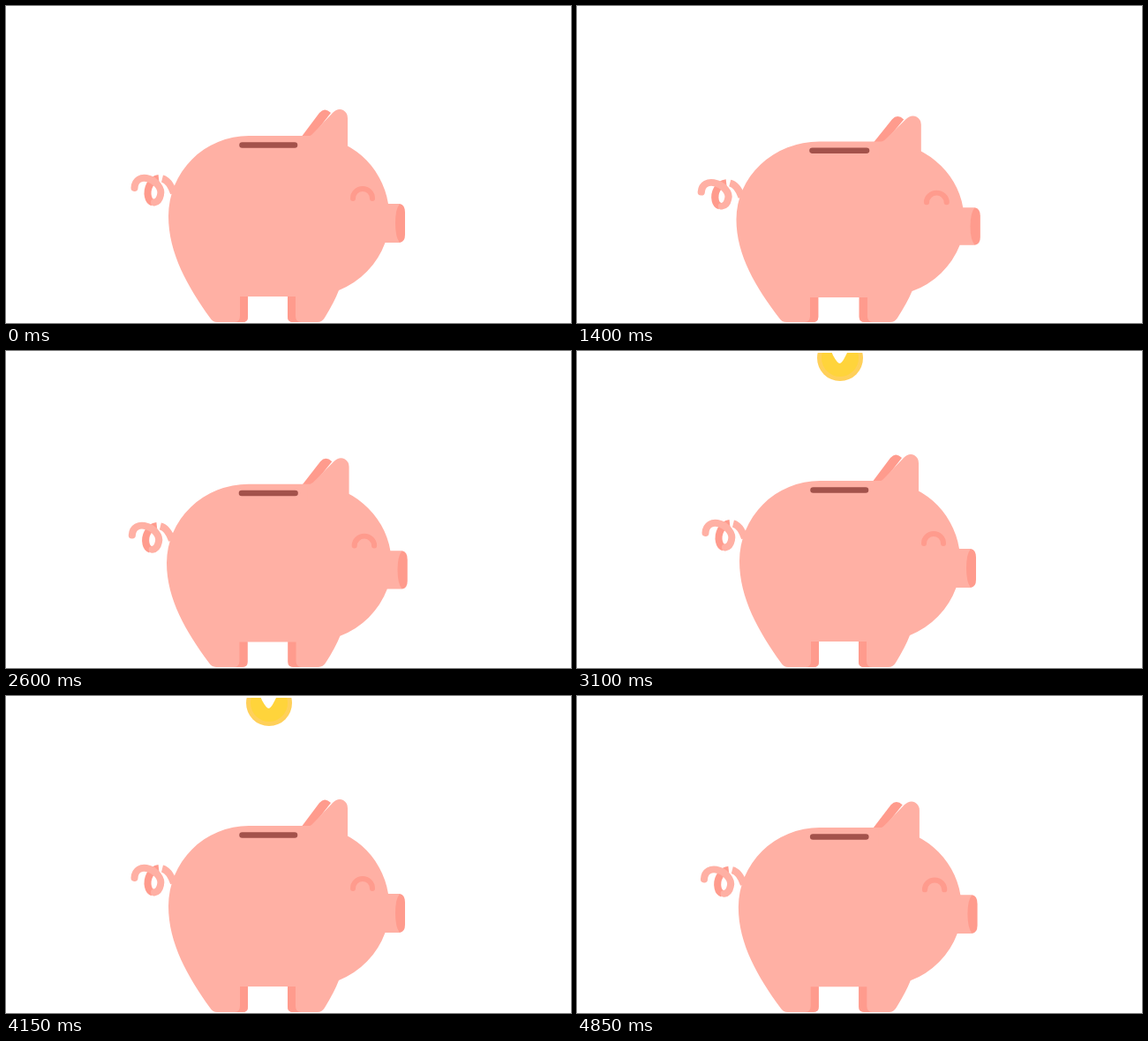
Animation of 640x359 px, one loop 5 s. Source, as an HTML page with a canvas:

```html
<!DOCTYPE html>
<html lang="en">
<head>
<meta charset="utf-8">
<title>Piggy bank</title>
<style>
html, body { margin: 0; width: 100%; height: 100%; overflow: hidden; background: #fff; }
canvas { display: block; }
</style>
</head>
<body>
<canvas id="stage" width="640" height="359"></canvas>
<script>
const ctx = document.getElementById('stage').getContext('2d');
const LOOP = 5000, TICK = 50, STEP = 80;
const DROPS = [160, 1130, 2100, 3070, 4110];
const SKIN = '#ffb0a4', SHADE = '#ff9b8d', SLOT = '#a3524b';
const GROUND = 358, MIDDLE = 297, SLOT_Y = 157.5;

const shape = d => new Path2D(d);
const body = shape('M275 147H345A91.5 91.5 0 0 1 433 224H446V268H429.5A92 92 0 0 1 377 322' +
  'Q372 335 361 353Q358 358 353 358H326Q319 358 319 352V329H274V352Q274 358 268 358H239' +
  'Q234 358 231 353C206 318 184 280 184 238A91 91 0 0 1 275 147Z');
const ear = shape('M341 149Q347 146 350 142L370 121Q376 115 382 118Q387 121 387 127V168H341Z');
const farEar = shape('M334 149L355 121Q361 114 368 121L346 149Z');
const legShade = shape('M265 329V351Q265 358 259 358H268Q274 358 274 352V329Z');
const nose = shape('M446 224Q452 225 452 234V259Q452 267 446 268Q441 262 441 246Q441 230 446 224Z');
const eye = shape('M393 218A11 11 0 0 1 415 218');
const slot = shape('M267.5 157.5H327');
const tailBack = shape('M166 222.5Q162 221 161 216C159 207 164 196 173 195');
const tailRoot = shape('M177 195.5C183 197 187 203 190 212');
const tailFront = shape('M145.5 206C146 196 154 194 159 195C170 197 177 207 175 214C174 219 172 222 168 222.5');

function fill(path, color) {
  ctx.fillStyle = color;
  ctx.fill(path);
}

function line(path, color, width, cap = 'round') {
  ctx.strokeStyle = color;
  ctx.lineWidth = width;
  ctx.lineCap = cap;
  ctx.stroke(path);
}

function disc(x, y, r, color) {
  ctx.fillStyle = color;
  ctx.beginPath();
  ctx.arc(x, y, r, 0, Math.PI * 2);
  ctx.fill();
}

// Quick squash on impact, slow release, then one small rebound.
function squash(t) {
  if (t < 180 || t >= 800) return 0;
  if (t < 320) return 0.05 * Math.sin((t - 180) / 140 * Math.PI / 2);
  if (t < 560) return 0.05 * Math.pow(1 - (t - 320) / 240, 0.95);
  return 0.0115 * Math.sin((t - 560) / 240 * Math.PI);
}

function drawCoin(t) {
  const y = 8 + 0.5 * t + 0.0018 * t * t;
  if (t < 0 || y - 26 > SLOT_Y) return;
  ctx.save();
  ctx.beginPath();
  ctx.rect(0, 2, 640, SLOT_Y - 2);
  ctx.clip();
  disc(298, y, 26, '#ffd05a');
  disc(298, y, 21, '#ffd43b');
  if (t < STEP) fill(shape('M288 0L290 5Q295 14 297.5 14Q300 14 304 6L307 0Z'), '#fff');
  ctx.restore();
}

function drawPig(s) {
  ctx.save();
  ctx.translate(MIDDLE, GROUND);
  ctx.scale(1 + s, 1 - s);
  ctx.translate(-MIDDLE, -GROUND);
  line(tailBack, SHADE, 8, 'butt');
  line(tailRoot, SKIN, 8, 'butt');
  line(tailFront, SKIN, 8);
  fill(farEar, SHADE);
  fill(body, SKIN);
  fill(ear, SKIN);
  fill(legShade, SHADE);
  ctx.save();
  ctx.transform(-1, 0, 0, 1, 593, 0);
  fill(legShade, SHADE);
  ctx.restore();
  fill(nose, SHADE);
  line(eye, SHADE, 6);
  line(slot, SLOT, 6.5);
  ctx.restore();
}

function draw(now) {
  const t = Math.floor(now % LOOP / TICK) * TICK;
  const start = DROPS.filter(d => d <= t).pop();
  const local = start === undefined ? -1 : Math.floor((t - start) / STEP) * STEP;
  ctx.fillStyle = '#fff';
  ctx.fillRect(0, 0, 640, 359);
  drawPig(squash(local));
  drawCoin(local);
}

const begin = performance.now();
function loop() {
  draw(performance.now() - begin);
  requestAnimationFrame(loop);
}
loop();
</script>
</body>
</html>
```
